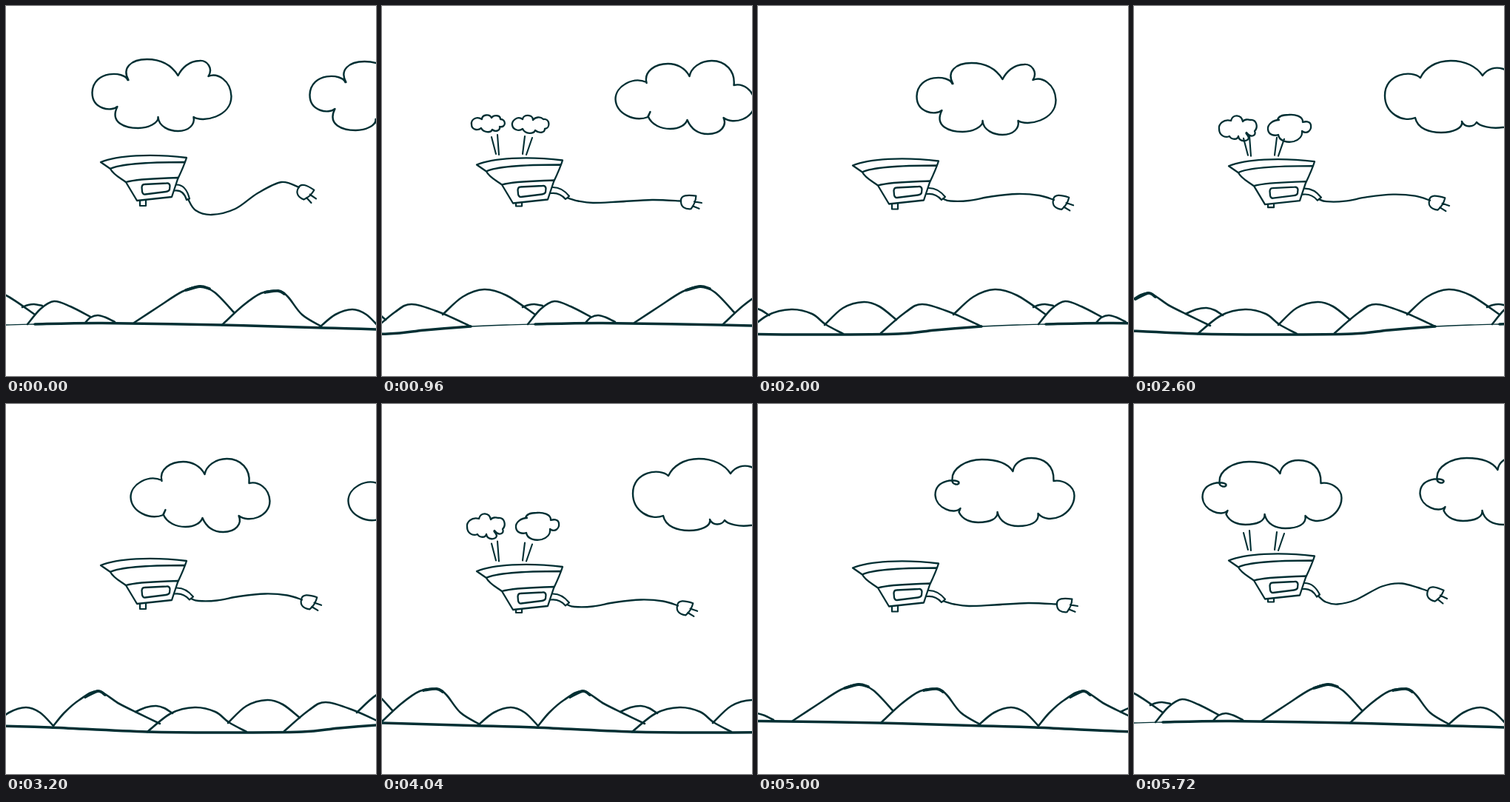
Recreate the animation shown at these times as an HTML page with a canvas. Size 500x500 px, loop 5760 ms.

```html
<!DOCTYPE html>
<html>
<head>
<meta charset="utf-8">
<style>
  html, body { margin: 0; width: 100%; height: 100%; overflow: hidden; background: #fff; }
  canvas { display: block; }
</style>
</head>
<body>
<canvas id="stage" width="500" height="500"></canvas>
<script>
const ctx = document.getElementById('stage').getContext('2d');
const LOOP = 5760, FRAME = 40, STEP = 120, STRIP = 1001;

// Smooth curve through "x,y x,y ..." points
function curve(text) {
  const p = text.split(' ').map(s => s.split(',').map(Number));
  const at = i => p[Math.max(0, Math.min(p.length - 1, i))];
  const path = new Path2D();
  path.moveTo(...p[0]);
  for (let i = 0; i < p.length - 1; i++) {
    const [a, b, c, d] = [at(i - 1), at(i), at(i + 1), at(i + 2)];
    path.bezierCurveTo(b[0] + (c[0] - a[0]) / 6, b[1] + (c[1] - a[1]) / 6,
      c[0] - (d[0] - b[0]) / 6, c[1] - (d[1] - b[1]) / 6, c[0], c[1]);
  }
  return path;
}

function stroke(path, width) {
  ctx.lineWidth = width;
  ctx.stroke(path);
}

function shifted(x, y, draw) {
  ctx.save();
  ctx.translate(x, y);
  draw();
  ctx.restore();
}

const hills = [
  '173,428 205,407 238,386 262,379 282,387 308,414',
  '292,431 320,405 345,388 368,385 381,393 400,417 426,433',
  '425,433 445,417 468,410 487,417 505,435',
  '505,435 520,417 540,400 565,388 594,405 620,418 649,432',
  '616,416 630,410 644,408 655,411 666,418',
  '632,443 664,418 696,410 724,416 742,430 766,443',
  '741,431 766,408 794,400 815,406 838,424',
  '817,442 850,414 873,403 911,414 953,433',
  '915,417 942,393 971,383 1001,391 1040,417',
  '1023,407 1031,404 1039,403 1050,405',
  '1030,430 1048,409 1066,399 1088,406 1115,420',
  '1108,428 1115,421 1125,418 1136,421 1148,427'
].map(curve);
const crests = ['243,384 262,379 275,382', '548,396 565,388 575,393', '350,387 368,385 376,389'].map(curve);
const ground = curve('39,430 130,428.5 290,431 430,435 500,437 632,443 740,444 841,443 891,438 953,433');
const thinGround = curve('953,433 1001,431 1040,430');

function land(x) {
  for (const offset of [x - 2 * STRIP, x - STRIP, x]) {
    shifted(offset, 0, () => {
      hills.forEach(h => stroke(h, 2.6));
      crests.forEach(c => stroke(c, 3.8));
      stroke(ground, 3.5);
      stroke(thinGround, 1.4);
    });
  }
}

const [cloudA, cloudB, cloudC, cloudD] = [
  'M164,100C160,88 117,86 116,117C116,140 142,143 150,136C139,158 161,165 178,165C192,165 206,158 205,150C206,163 220,169 232,169C247,169 255,160 253,150C265,158 304,150 304,122C303,100 285,90 273,95C280,84 271,73 261,74C247,74 237,84 232,94C222,78 208,72 190,72C168,72 156,84 165,100',
  'M158,103C140,95 116,108 116,126C117,146 142,157 160,150L163,143L160,149C165,161 178,166 190,166C203,166 211,160 213,154C219,168 230,173 241,173C258,173 267,162 262,151C275,161 304,153 304,131C303,113 288,104 276,107C278,88 265,74 246,74C230,74 218,84 216,95C210,83 198,78 187,78C170,78 154,88 158,104',
  'M164,97C152,86 116,91 116,121C116,145 140,158 157,151C160,166 177,171 192,171C208,171 222,165 220,156C224,165 236,164 240,157C248,168 304,172 304,135C304,115 295,106 290,104C292,86 262,74 248,94C240,82 225,74 205,74C185,74 170,84 164,97',
  'M139,105C138,113 149,113 148,109C146,104 116,104 116,126C117,144 142,153 150,144L148,149C153,160 165,163 174,163C190,163 201,158 200,149C203,163 216,168 228,168C244,168 257,163 255,151C270,168 304,152 304,127C304,113 288,105 276,107C277,85 262,76 246,76C232,76 222,84 221,94C214,83 198,78 179,78C158,78 138,90 139,105'
].map((d, i) => ({ path: new Path2D(d), dx: [0.5, 3.5, 2.5, 1][i] }));
const cloudCycle = [cloudA, cloudC, cloudB, cloudC, cloudA, cloudD];
const cloudLift = [0, 0, 0, 0, 0, 5, -3, 3, 0, 0, 0, 5, -5, 3, 0, 5, 0]; // by age, from -1

function clouds(step) {
  const { path, dx } = cloudCycle[step % 6];
  for (const age of [step - 12, step, step + 12]) {
    if (age < -1 || age > 15) continue;
    shifted(24.5 * age + dx, cloudLift[age + 1], () => stroke(path, 2.4));
  }
}

const smallPuffs = new Path2D(
  'M135,153C127,148 120,154 121,160C121,167 129,169 134,165C137,171 147,172 149,167C154,171 160,168 159,163C168,165 168,153 160,153C160,147 151,147 148,151C145,145 135,147 135,153' +
  'M190,153C183,148 175,155 176,161C177,167 185,170 190,166C194,174 205,173 207,168C213,173 220,171 220,166C228,165 227,152 218,153C214,149 207,150 204,154C204,146 191,146 190,153');
const bigPuffs = new Path2D(
  'M131,155C121,152 114,160 115,166C115,174 122,179 129,176C132,181 140,181 141,176C142,184 154,184 155,178C154,174 150,172 152,171C158,179 166,175 163,169C168,164 166,153 157,154C154,153 149,153 147,156C145,146 133,146 131,155' +
  'M196,154C188,154 180,160 181,167C182,174 189,176 195,174C196,183 208,185 216,183C223,181 228,176 227,169C234,174 240,168 239,161C238,155 231,156 228,157C229,149 217,146 209,147C202,147 195,149 194,154');

function puffs(step) {
  if (step < 7 || step > 10) return;
  const scale = { 7: 0.6, 10: 1.35 }[step] || 1;
  ctx.save();
  ctx.translate(173, 164);
  ctx.scale(scale, scale);
  ctx.translate(-173, step == 7 ? -150 : -164);
  stroke(step < 9 ? smallPuffs : bigPuffs, 2.3 / scale);
  ctx.restore();
}

const body = new Path2D(
  'M128,211C150,202 195,199 244,205Q241,215 232,234L224,258L177,263L162,238C154,232 145,228 141,220Z' +
  'M141,220C155,213 195,211 241,211M162,238C180,233 210,233 232,232' +
  'M187,241L217,239.5Q221,239 221.5,243L221,248Q220,250.5 216,251L188,254.5Q185,255 184,251L183.5,245Q184,241 187,241Z');
const steam = new Path2D('M148,173.5L154,196.5M156,170.5L158,197.5M193,172.5L190,196.5M203,174.5L195,197.5');
const plug = new Path2D('M0,0C-1,-8 8,-9 20,-8Q20,2 14,10C6,11 0,8 0,0M18,0L28,1M16,6L25,9');

// Cord poses from straight to wavy
const poses = [
  { end: [253, 253.5, 248, 257.5], tip: [404, 260, 3], cord: '251,256 265,260 285,262.5 320,261 365,258.5 404,260' },
  { end: [253, 253.5, 248, 257.5], tip: [399, 257.5, 13], cord: '250,256 260,259 285,258.5 315,253 350,249.5 380,251.5 400,257.5' },
  { end: [251, 257, 247, 260], tip: [397, 252, 20], cord: '249,259 259,267 275,270 300,264 335,246 362,242 397,252' },
  { end: [248, 260.5, 244, 262], tip: [395, 246, 29], cord: '246,261 256,276 278,282 310,274 340,253 372,238 396,245' }
].map(({ end: [ax, ay, bx, by], tip, cord }) => ({
  tip, cord: curve(cord),
  handle: new Path2D(`M230,241.5Q243,241 ${ax},${ay}L${bx},${by}Q240,248 228,249.5`)
}));
const poseCycle = [3, 2, 1, 1, 1, 0, 0, 0, 0, 1, 1, 2];

const bob = [[0, 0], [960, 3.5], [2000, 4.5], [3200, 7], [4040, 15], [5000, 10.5], [5720, 0.5]];

function bobAt(t) {
  const n = bob.length;
  const key = i => {
    const turn = Math.floor(i / n), [time, y] = bob[i - turn * n];
    return [time + turn * LOOP, y];
  };
  const slope = i => {
    const [a, b] = [key(i - 1), key(i + 1)];
    return (b[1] - a[1]) / (b[0] - a[0]);
  };
  const i = bob.findLastIndex(k => k[0] <= t);
  const [t0, y0] = key(i), [t1, y1] = key(i + 1);
  const span = t1 - t0, u = (t - t0) / span, v = 1 - u;
  return v * v * (1 + 2 * u) * y0 + u * u * (3 - 2 * u) * y1
    + span * u * v * (v * slope(i) - u * slope(i + 1));
}

function iron(step) {
  const pressed = step >= 6;
  const { handle, cord, tip: [x, y, angle] } = poses[poseCycle[step]];
  stroke(body, 2.3);
  stroke(new Path2D(`M181,263V${pressed ? 267 : 270}H189V262`), 2.2);
  stroke(handle, 2.2);
  stroke(cord, 2.3);
  if (pressed) stroke(steam, 2.1);
  shifted(x, y, () => {
    ctx.rotate(angle * Math.PI / 180);
    stroke(plug, 2.2);
  });
}

function draw() {
  const t = Math.floor(performance.now() % LOOP / FRAME) * FRAME;
  const step = Math.floor(t / STEP) % 12;
  ctx.fillStyle = '#fff';
  ctx.fillRect(0, 0, 500, 500);
  ctx.strokeStyle = '#022f33';
  ctx.lineCap = ctx.lineJoin = 'round';
  land(0.175 * t);
  clouds(step);
  puffs(step);
  shifted(0, bobAt(t), () => iron(step));
  requestAnimationFrame(draw);
}
draw();
</script>
</body>
</html>
```
